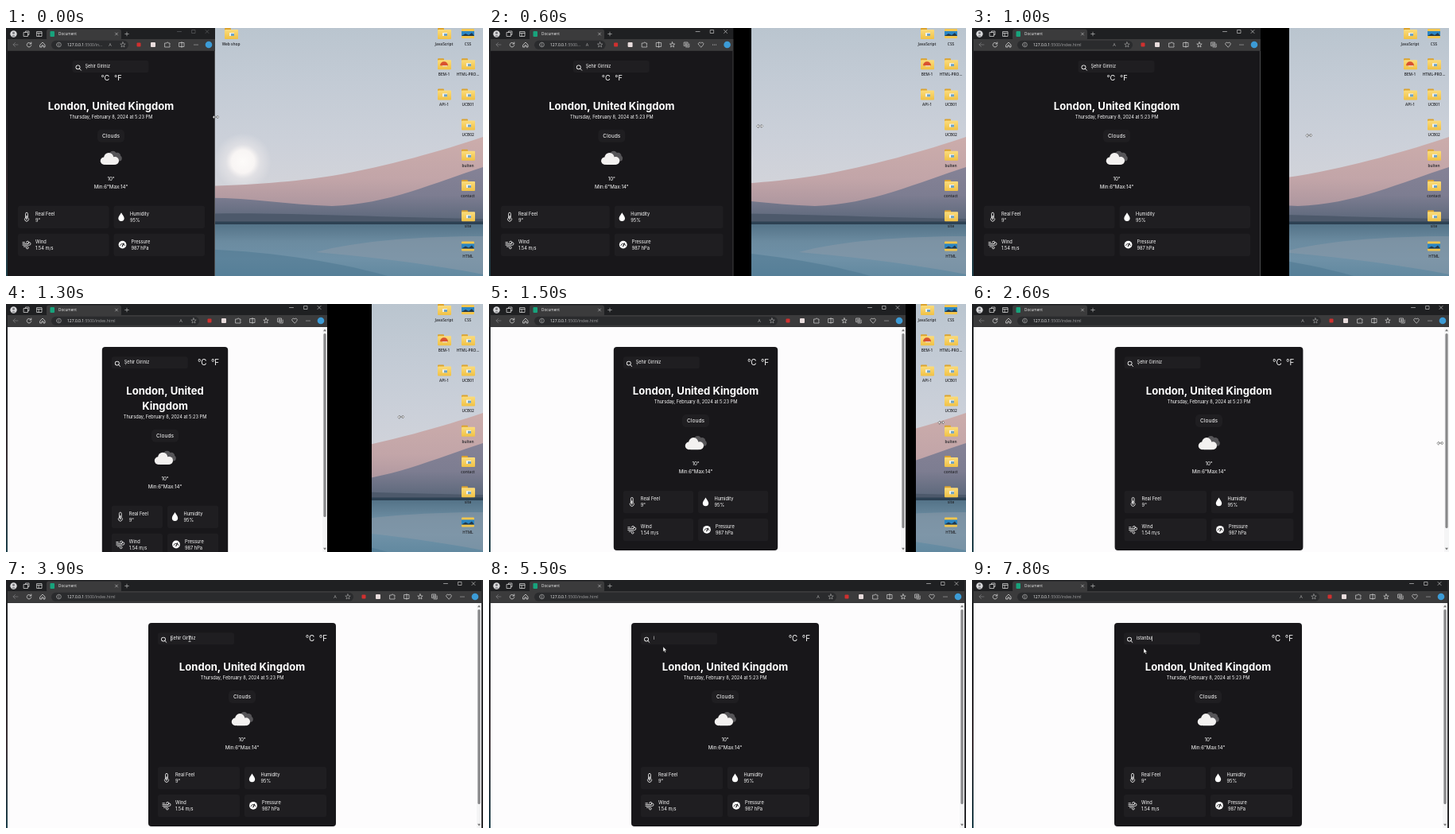
Recreate the animation shown at these times as an HTML page with a canvas. Size 600x312 px, loop 8 s.

```html
<!DOCTYPE html>
<html lang="en">
<head>
<meta charset="utf-8">
<title>Weather page resize</title>
<style>
html, body { margin: 0; height: 100%; overflow: hidden; background: #000; }
canvas { display: block; width: 100vw; height: 100vh; }
</style>
</head>
<body>
<canvas id="stage"></canvas>
<script>
const LOOP = 8000, W = 600, H = 312;
const UI = '"Open Sans", sans-serif', PAGE = 'Inter, sans-serif';
const CARD = '#18171a', BOX = '#1f1e21';
const canvas = document.getElementById('stage');
const g = canvas.getContext('2d');
const dpr = window.devicePixelRatio || 1;
canvas.width = W * dpr;
canvas.height = H * dpr;

// Keyframes: [time, value, ...]
const windowRight = [[0, 263], [100, 266], [200, 266], [700, 318], [800, 318], [1000, 363],
  [1300, 404], [1500, 524], [1600, 524], [1700, 541], [1800, 541], [2100, 560], [2200, 560],
  [2500, 600], [2600, 600], [2700, 598]];
const desktopLeft = [[0, 263], [100, 270], [200, 270], [700, 345], [800, 345], [1000, 399],
  [1300, 460], [1500, 537], [1600, 537], [2100, 580], [2200, 580], [2500, 602]];
const pointer = [[0, 264, 112], [100, 272, 113], [200, 272, 113], [700, 358, 126], [800, 358, 126],
  [1000, 424, 135], [1300, 497, 142], [1500, 569, 149], [1600, 569, 149], [2100, 585, 164],
  [2200, 585, 164], [2600, 589, 175], [2700, 589, 175], [3100, 336, 139], [3500, 231, 74],
  [4000, 231, 74], [4600, 219, 84], [6000, 219, 84], [6200, 216, 86]];
const word = 'istanbu', keys = [5000, 6100, 6400, 6500, 7000, 7300, 7700], focusAt = 3900;

function at(frames, t) {
  const i = frames.findIndex(f => f[0] > t);
  if (i < 0) return frames[frames.length - 1].slice(1);
  const a = frames[i - 1], b = frames[i], k = (t - a[0]) / (b[0] - a[0]);
  return a.slice(1).map((v, j) => v + (b[j + 1] - v) * k);
}

function rect(x, y, w, h, color, r = 0) {
  g.fillStyle = color;
  g.beginPath();
  g.roundRect(x, y, w, h, r);
  g.fill();
}

function dot(x, y, r, color) {
  g.fillStyle = color;
  g.beginPath();
  g.arc(x, y, r, 0, 7);
  g.fill();
}

function text(s, x, y, size, color = '#fff', align = 'left', font = PAGE, weight = 400) {
  g.font = `${weight} ${size}px ${font}`;
  g.textAlign = align;
  g.textBaseline = 'middle';
  g.fillStyle = color;
  g.fillText(s, x, y);
}

function shape(d, x, y, stroke, fill, width = 0.8) {
  const p = new Path2D(d);
  g.save();
  g.translate(x, y);
  g.lineWidth = width;
  g.lineCap = g.lineJoin = 'round';
  if (fill) { g.fillStyle = fill; g.fill(p); }
  if (stroke) { g.strokeStyle = stroke; g.stroke(p); }
  g.restore();
}

function vertical(y0, y1, ...colors) {
  const grad = g.createLinearGradient(0, y0, 0, y1);
  colors.forEach((c, i) => grad.addColorStop(i / (colors.length - 1), c));
  return grad;
}

function folder(x, y, label, kind) {
  if (kind === 'photo') {
    rect(x - 8, y - 6, 16, 12, '#f3c64e', 1);
    rect(x - 8, y - 3, 16, 6, '#2b86c4');
    shape('M-8 3L-3 0L1 2L5 -1L8 3Z', x, y, null, '#23384a');
  } else {
    rect(x - 8, y - 7, 8, 5, '#dba32f', 1);
    rect(x - 8, y - 5, 17, 12, vertical(y - 5, y + 7, '#fbdc7c', '#f0c145'), 1);
    rect(x - 2, y - 1, 6, 4, '#eef3f5');
    if (kind === 'red') shape('M-5 2A5 5 0 0 1 5 2Z', x, y, null, '#d9512f');
    else rect(x, y, 4, 3, '#6fa3c4');
  }
  text(label, x, y + 13.5, 4.8, '#25262a', 'center', UI, 600);
}

function desktop() {
  rect(0, 0, W, H, vertical(0, 205, '#bac5cf', '#c3cbd5', '#cbd0d9', '#d3d4da'));
  const glow = g.createRadialGradient(298, 168, 0, 298, 168, 36);
  glow.addColorStop(0, '#fdfbf9');
  glow.addColorStop(0.4, '#f8f5f4');
  glow.addColorStop(0.6, 'rgba(244,240,240,.45)');
  glow.addColorStop(1, 'rgba(244,240,240,0)');
  rect(255, 125, 90, 90, glow);

  // sunlit dune, its shaded slope, then the shore
  shape('M240 199C310 198 365 193 410 186C480 174 550 154 600 137V246H240Z', 0, 0, null,
    vertical(140, 240, '#cbacab', '#c2a5a8', '#a38f9a'));
  shape('M240 214C300 212 350 222 410 224C480 222 540 194 600 175V246H240Z', 0, 0, null,
    vertical(175, 246, '#858296', '#7d7d91', '#586578'));
  shape('M240 234C330 231 460 238 600 240V247H240Z', 0, 0, null, '#4d596b');
  rect(0, 243.5, W, 4, '#2d4153');
  rect(0, 247, W, 65, vertical(247, 312, '#547388', '#6b8ba0', '#6f91a7', '#6289a0'));
  shape('M600 262C520 262 440 268 390 282C460 288 540 298 600 310Z', 0, 0, null, 'rgba(142,155,170,.5)');
  shape('M240 278C320 280 410 292 480 312H240Z', 0, 0, null, 'rgba(74,118,143,.5)');

  folder(283, 7, 'Web shop');
  ['JavaScript', 'BEM-1', 'API-1'].forEach((s, i) => folder(551, 7 + i * 38.2, s, i === 1 && 'red'));
  ['CSS', 'HTML-PRO…', 'UCB01', 'UCB02', 'bulten', 'contact', 'site', 'HTML'].forEach((s, i) =>
    folder(581, 7 + i * 38.2, s, i % 7 === 0 && 'photo'));
}

function chrome(right, active) {
  rect(0, 0, right, 29, '#1f2022');
  dot(9.5, 7.5, 4.2, '#d8d8da');
  dot(9.5, 6.3, 1.5, '#77787c');
  shape('M-2.6 2.4Q0 -.6 2.6 2.4', 9.5, 8, null, '#77787c');
  shape('M-3 -2H2V3H-3ZM-1 -2V-3.5H3.5V1H2', 25.5, 7.5, '#d0d0d0');
  shape('M-3 -3H3V3H-3ZM-3 -1H3M-.8 -1V3', 42, 7.5, '#d0d0d0');
  rect(51, 1.5, 94, 14, '#3b3b3c', 3);
  rect(2, 14, right - 2, 14.7, '#3b3b3c');
  rect(55.5, 4, 5.5, 7, '#18a37c', 1);
  text('Document', 66, 7.6, 4.7, '#eee', 'left', UI);
  shape('M-1.5 -1.5L1.5 1.5M1.5 -1.5L-1.5 1.5', 139, 7.5, '#ccc', null, 0.6);
  shape('M-2.3 0H2.3M0 -2.3V2.3', 152, 7.5, '#ccc', null, 0.6);
  const control = active ? '#ddd' : '#66676a';
  shape('M-2.5 0H2.5', right - 45, 4.5, control, null, 0.6);
  shape('M-2 -2H2V2H-2Z', right - 27, 4.5, control, null, 0.6);
  shape('M-2 -2L2 2M2 -2L-2 2', right - 10, 4.5, control, null, 0.6);

  const narrow = right < 300, shift = narrow ? 52 : 0, aa = right - 184 + shift;
  shape('M3 0H-3L-.5 -2.5M-3 0L-.5 2.5', 12, 21, '#77787a');
  shape('M2.5 -1.2A2.8 2.8 0 1 0 2.8 .8M2.8 -3V-1H.8', 29, 21, '#d5d5d5');
  shape('M-3 0L0 -3L3 0V3H1V.8H-1V3H-3Z', 46, 21, '#d5d5d5');
  rect(57, 15.8, aa + 23 - 57, 11, '#2a2b2d', 5.5);
  shape('M-2.8 0A2.8 2.8 0 1 1 2.8 0A2.8 2.8 0 1 1 -2.8 0M0 -.2V1.4M0 -1.4V-1.3', 66.5, 21, '#ccc', null, 0.6);
  const host = '127.0.0.1', room = Math.floor((aa - 8 - 77) / 2.55);
  let path = ':5500/index.html';
  if (room < 25) path = path.slice(0, Math.max(3, room - 10)) + '…';
  text(host, 77, 21.2, 5, '#f2f2f2', 'left', UI);
  text(path, 77 + g.measureText(host).width, 21.2, 5, '#a0a0a2', 'left', UI);
  text('A', aa, 21.2, 5.5, '#aaa', 'center', UI);

  const star = 'M0 -3.2L.9 -1L3.2 -.9L1.4 .6L2 3L0 1.7L-2 3L-1.4 .6L-3.2 -.9L-.9 -1Z';
  shape(star, right - 168 + shift, 21, '#aaa', null, 0.6);
  rect(right - 150.5 + shift, 18.5, 5, 5, '#d0302f', 1);
  rect(right - 133 + shift, 18, 6, 6, '#e8dcdc', 1);
  shape('M-3 -2H-.8A1 1 0 0 1 1.2 -2H3V0A1 1 0 0 0 3 1.5V3H-3Z', right - 112 + shift, 21, '#d5d5d5', null, 0.7);
  shape('M-3 -2.5H3V2.5H-3ZM0 -3.5V3.5', right - 94 + shift, 21, '#d5d5d5', null, 0.7);
  if (!narrow) {
    shape(star, right - 77, 21, '#d5d5d5', null, 0.7);
    shape('M-3 -3H1.5V1.5H-3ZM3.2 -1V3H-1M-.8 -2V.6M-2 -.7H.5', right - 59, 21, '#d5d5d5', null, 0.7);
    shape('M0 3L-3 0A1.7 1.7 0 0 1 0 -2A1.7 1.7 0 0 1 3 0Z', right - 41, 21, '#d5d5d5', null, 0.7);
  }
  for (const dx of [-2, 0, 2]) dot(right - 24 + dx, 21, 0.55, '#ddd');
  dot(right - 8, 21, 4.3, '#3c9bd6');
}

function cloud(x, y) {
  for (const [dx, dy, r] of [[2.5, -4.3, 4.7], [8, -2.8, 4.2], [10.3, 0.3, 3.5]]) dot(x + dx, y + dy, r, '#565558');
  rect(x, y - 3, 11, 6.8, '#565558', 2);
  for (const [dx, dy, r] of [[-8.4, 3.4, 4.8], [-2.8, -0.8, 6.1], [5, 3.2, 5]]) dot(x + dx, y + dy, r, '#f3f1f0');
  rect(x - 8.5, y + 2, 14, 6.2, '#f3f1f0', 2);
}

const stats = [
  ['Real Feel', '9°', 11, (x, y) => {
    shape('M-1.4 1V-4A1.4 1.4 0 0 1 1.4 -4V1A2.5 2.5 0 1 1 -1.4 1Z', x, y, '#fff', null, 0.8);
    shape('M0 -1V3', x, y, '#fff', null, 1.2);
  }],
  ['Humidity', '95%', 9.5, (x, y) => shape('M0 -5.4C1.5 -2.6 3.7 -.5 3.7 1.7A3.7 3.7 0 0 1 -3.7 1.7C-3.7 -.5 -1.5 -2.6 0 -5.4Z', x, y, null, '#fff')],
  ['Wind', '1.54 m/s', 11, (x, y) => shape('M-5 -1.2H1.2A1.6 1.6 0 1 0 -.4 -2.9M-5 .6H3.2A1.7 1.7 0 1 0 1.6 -1.2M-3.6 2.4H.8A1.4 1.4 0 1 1 -.6 3.8M-5 -3H-2.5', x, y, '#fff', null, 0.8)],
  ['Pressure', '987 hPa', 11, (x, y) => {
    dot(x, y, 4.9, '#fff');
    shape('M-3 1A3.1 3.1 0 0 1 3 1', x, y, CARD, null, 0.8);
    shape('M-.2 2L1.6 -1.6', x, y, CARD, null, 1.2);
  }]
];

function search(x, y, t) {
  rect(x, y, 96, 15, BOX, 3);
  dot(x + 7, y + 8.3, 2.9, '#fff');
  dot(x + 7, y + 8.3, 2.1, BOX);
  shape('M0 0L1.8 1.8', x + 9.1, y + 10.4, '#fff', null, 0.9);
  const typed = word.slice(0, keys.filter(k => k <= t).length);
  const ty = y + 7.4;
  text(typed || 'Şehir Giriniz', x + 16, ty, 5.5, '#fff');
  const since = t - Math.max(focusAt, ...keys.filter(k => k <= t));
  if (since >= 0 && since % 1000 < 500) {
    const w = typed ? g.measureText(typed).width : 0;
    rect(x + 16.2 + w, ty - 3.2, 0.6, 6.4, '#fff');
  }
}

function page(right, t) {
  const narrow = right < 380;
  const left = narrow ? 2 : 0.3 * right - 0.4;
  const width = narrow ? right - 2 : 0.4 * (right - 8);
  const pad = narrow ? 13 : 12, mid = narrow ? (right + 1) / 2 : left + width / 2;
  const inner = width - 2 * pad, wrap = !narrow && inner < 160;
  rect(2, 28.7, right - 2, H, narrow ? CARD : '#fdfcfd');
  if (narrow) rect(right - 1, 28.7, 1, H, '#4a4a4c');
  else rect(left, 54, width, wrap ? 275 : 256, CARD, 4);

  if (narrow) search(mid - 48.5, 41, t);
  else search(left + pad, 66.3, t);
  const end = left + width, uy = narrow ? 63 : 74, us = narrow ? 9.2 : 9.8;
  text('°C', narrow ? mid - 12.5 : end - 38.3, uy, us);
  text('°F', narrow ? mid + 4 : end - 21.3, uy, us);

  const dy = narrow ? -11.2 : wrap ? 18.7 : 0;
  const title = wrap ? ['London, United', 'Kingdom'] : ['London, United Kingdom'];
  title.forEach((s, i) =>
    text(s, mid, 109.8 + (wrap ? 0 : dy) + i * 19, 13.1, '#fff', 'center', PAGE, 700));
  text('Thursday, February 8, 2024 at 5:23 PM', mid, 123.2 + dy, 5.65, '#fff', 'center');
  rect(mid - 17, 139 + dy, 34, 16, BOX, 5);
  text('Clouds', mid, 147.2 + dy, 6.7, '#fff', 'center');
  cloud(mid, 175 + dy);
  text('10°', mid, 201.5 + dy, 6.2, '#fff', 'center');
  text('Min:6°Max:14°', mid, 211 + dy, 6.2, '#fff', 'center');

  const bw = (inner - 6) / 2;
  stats.forEach(([name, value, dx, icon], i) => {
    const x = left + pad + (i % 2) * (bw + 6), y = 235 + dy + (i > 1 ? 35 : 0);
    rect(x, y, bw, 28.3, BOX, 3);
    icon(x + dx, y + 13.8);
    text(name, x + dx + 11, y + 10.2, 5.7);
    text(value, x + dx + 11, y + 18.4, 5.7);
  });

  if (!narrow) {
    rect(right - 6, 28.7, 6, H, '#f5f5f6');
    rect(right - 4.6, 37, 3.2, wrap ? 231 : 245, '#88888a', 1.6);
    shape('M-2 1.2L0 -1.5L2 1.2Z', right - 3, 33, null, '#777');
    shape('M-2 -1.2L0 1.5L2 -1.2Z', right - 3, 308, null, '#777');
  }
}

function cursor(t) {
  const [x, y] = at(pointer, t);
  if (t < 2800) {
    shape('M-4 0L-2 -2V-.6H2V-2L4 0L2 2V.6H-2V2Z', x, y, '#444', '#fff', 0.5);
  } else if (y < 81) {
    shape('M-1.3 -3.5H1.3M0 -3.5V3.5M-1.3 3.5H1.3', x, y, '#ddd', null, 0.6);
  } else {
    shape('M0 0V6.2L1.4 5L2.4 7.2L3.5 6.7L2.5 4.6H4.4Z', x, y, '#222', '#fff', 0.5);
  }
}

function draw(now) {
  const t = Math.floor(now % LOOP / 100) * 100;
  const [right] = at(windowRight, t), [edge] = at(desktopLeft, t);
  g.setTransform(canvas.width / W, 0, 0, canvas.height / H, 0, 0);
  desktop();
  rect(0, 0, edge, H, '#000');
  rect(0, 0, 2, H, vertical(0, H, '#202124', '#202124', '#3a3034', '#1d3f4a'));
  g.save();
  g.beginPath();
  g.rect(0, 0, right, H);
  g.clip();
  page(right, t);
  chrome(right, t >= 300);
  g.restore();
  if (t >= 2700) rect(right, 0, W - right, H, '#2a2a2c');
  cursor(t);
}

const start = performance.now();
(function tick() {
  draw(performance.now() - start);
  requestAnimationFrame(tick);
})();
</script>
</body>
</html>
```
